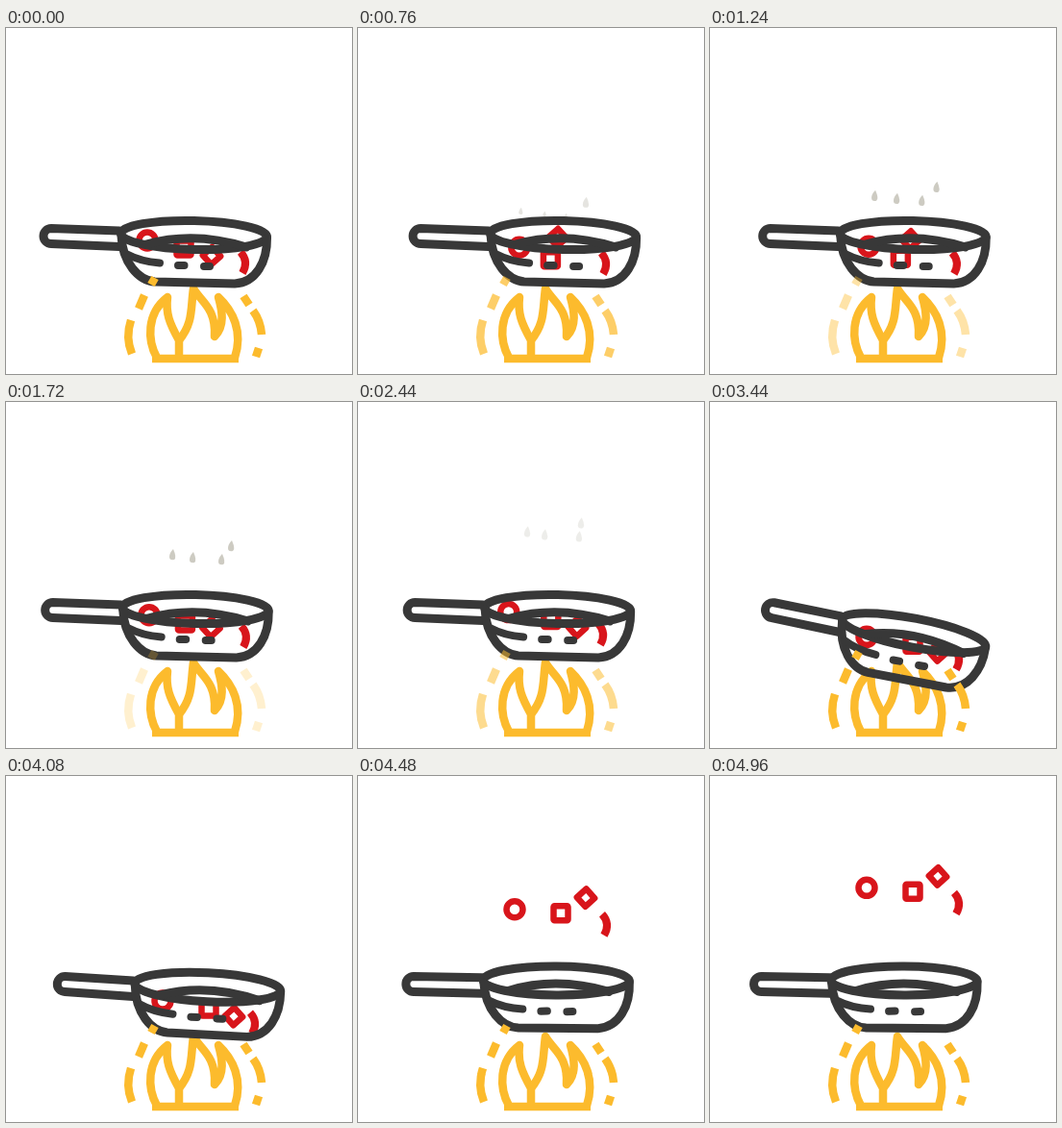
Animation of 360 by 360 pixels, one loop 5 s. Source, as an HTML page:

```html
<!DOCTYPE html>
<html lang="en">
<head>
<meta charset="utf-8">
<title>Frying pan</title>
<style>
  html, body { margin: 0; width: 100%; height: 100%; overflow: hidden; background: #fff; }
  svg { display: block; width: 100%; height: 100%; }
  path, rect, circle, ellipse { fill: none; }
  #flame, #glow { stroke: #fcbb2d; stroke-width: 8.5; stroke-linejoin: round; }
  #food { stroke: #d8151b; stroke-width: 6.5; stroke-linejoin: round; }
  #pan { stroke: #383838; stroke-width: 9; stroke-linecap: round; stroke-linejoin: round; }
  #drop { fill: #c8c6bc; }
</style>
</head>
<body>
<svg viewBox="0 0 360 360">
  <defs><path id="drop" d="M1-6Q5 3 2 5Q-3 6-3 2Q-3-2 1-6Z"/></defs>
  <g id="flame">
    <path d="M157 343C147 325 146 297 168 280C166 297 170 307 180 325V343"/>
    <path d="M180 325C195 307 192 292 195 271C202 284 219 291 217 321C228 310 225 294 221 280C236 294 247 316 238 343"/>
    <path d="M152 344H242"/>
  </g>
  <g id="steam"></g>
  <g id="food">
    <circle r="8.500"/>
    <rect x="-7.5" y="-7.5" width="15" height="15" rx="1"/>
    <rect x="-6.5" y="-6.5" width="13" height="13" transform="rotate(48)"/>
    <path d="M-3-11Q6-1-1 11" stroke-width="8"/>
  </g>
  <g id="pan">
    <path d="M118 211L47 208.5A8 8 0 0 0 47 224.5L118 227.5"/>
    <ellipse cx="195.500" cy="215.500" rx="76" ry="15" transform="rotate(1.3 195.5 215.5)"/>
    <path d="M146 225Q196 211 250 228"/>
    <path d="M120 216C121 244 138 263 155 264L238 266C260 265 272 243 271.500 218"/>
    <path d="M125 235Q140 243 160 244.500M179 247H185.500M206 248H212" stroke-width="8"/>
  </g>
  <g id="glow">
    <path d="M155 260L151 267M144 278L138 292M130 304Q124 322 131 339M247 279L253 288M257 294Q265 305 266 319M263 333L260 342"/>
  </g>
</svg>
<script>
const LOOP = 5000, SHAKE = 1900, TILT = 2850, TOSS = 4080, APEX = 4772;
const $ = id => document.getElementById(id);
const smooth = u => (1 - Math.cos(Math.PI * u)) / 2;
const ramp = (t, from, to) => smooth(Math.min(1, Math.max(0, (t - from) / (to - from))));
const place = (node, x, y, more = "") => node.setAttribute("transform", `translate(${x} ${y}) ${more}`);

// Each drop: position once the steam is fully up, and sideways drift.
const drops = [[173, 159, 4], [194, 162, 0], [224, 164, 8], [234, 150, -3]];

// home: resting place, swing: reach of the first shake, slide: x reached before the toss.
const pieces = [
  { home: [147, 221], swing: [170, 229], slide: 163, apex: 100 },
  { home: [185, 229], swing: [202, 242], slide: 211, apex: 104 },
  { home: [214, 237], swing: [207, 216], slide: 237, apex: 88 },
  { home: [247, 244], swing: [257, 245], slide: 257, apex: 116 }
];

const shake = t => smooth(2 * Math.min(t, TILT) / SHAKE);
const panShift = t => 20 * (shake(t) - ramp(t, TILT, TILT + 3450));
const panTilt = t => 9.5 * ramp(t, TILT, 3440) - 10.5 * ramp(t, 3440, 4400);

function foodAt({ home, swing, slide, apex }, t) {
  const reach = t < SHAKE ? swing : [slide, home[1] - 4];
  let [x, y] = home.map((v, n) => v + (reach[n] - v) * shake(t));
  y += 15 * ramp(t, TILT, 3440) + 1.3 * panTilt(t);
  if (t > TOSS) y = Math.min(y, apex + 4.57e-4 * (t - APEX) ** 2);
  return [x, y];
}

function draw(t) {
  place($("pan"), panShift(t), 0, `rotate(${panTilt(t)} 46 216)`);
  $("glow").setAttribute("opacity", 1 - .78 * (ramp(t, 0, 1850) - ramp(t, 1850, 3200)));

  $("steam").setAttribute("opacity", .9 * ramp(t, 570, 950) * (1 - ramp(t, 1900, 2800)));
  drops.forEach(([x, y, drift], i) => {
    const age = (t - 1720) / 1000, top = y - 33 * age;
    const size = Math.min(1, Math.max(.5, (204 - top) / 20));
    place($("steam").children[i], x + drift * age, top, `scale(${size})`);
  });

  pieces.forEach((piece, i) =>
    place($("food").children[i], ...foodAt(piece, t), i === 2 ? "rotate(48)" : ""));
}

function tick() {
  draw(performance.now() % LOOP);
  requestAnimationFrame(tick);
}

$("steam").innerHTML = drops.map(() => '<use href="#drop"/>').join("");
tick();
</script>
</body>
</html>
```
